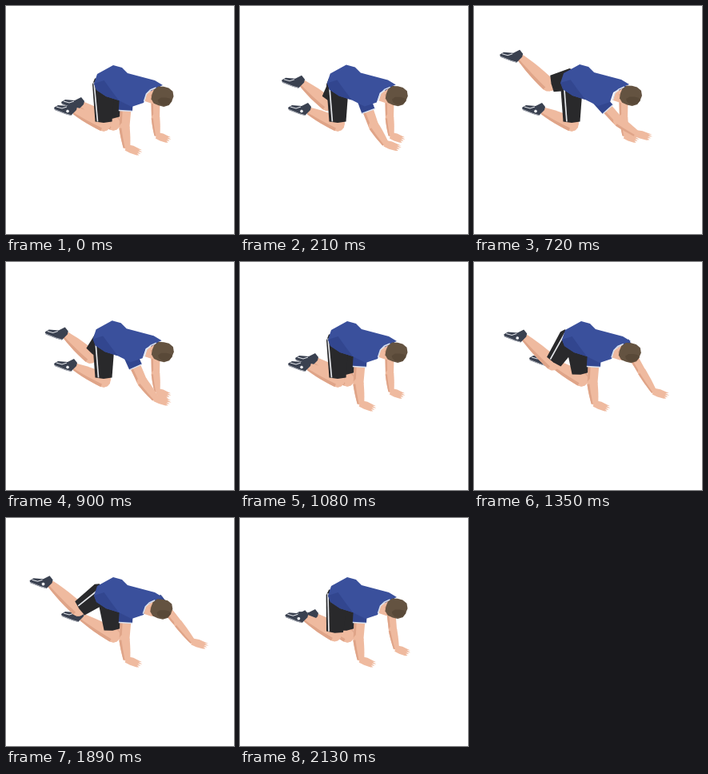
Recreate the animation shown at these times as an HTML page. Size 285 by 285 pixels, loop 2.16 s.

```html
<!DOCTYPE html>
<html lang="en">
<head>
<meta charset="utf-8">
<style>
  html, body { margin: 0; width: 100%; height: 100%; overflow: hidden; background: #fff; }
  svg { display: block; width: 100vw; height: 100vh; }
</style>
</head>
<body>
<svg id="stage" viewBox="0 0 285 285"></svg>
<script>
const HALF = 1080, PEAK = 570, STEP = 30;
const SKIN = '#efba9f', SHADE = '#dfa488', BLACK = '#29292b', BLUE = '#3a509c',
      DARK_BLUE = '#32468f', NAVY = '#3a4150', TRIM = '#dbe2ef', HAIR = '#645341';

// Joints from root to tip, at rest and raised; bow bends the path between, scaled per joint by share.
const limbs = {
  farLeg: { rest: [[128, 98], [134, 147], [95, 124]], raised: [[121, 90], [89, 88], [49, 50]],
            bow: [-9, -3], share: [0, 1, 0] },
  nearLeg: { rest: [[122, 98], [122, 148], [86, 131]], raised: [[117, 92], [72, 76], [38, 54]],
             bow: [0, 13], share: [0, 1, 0] },
  nearArm: { rest: [[150, 122], [148, 152], [151, 177], [170, 184]],
             raised: [[162, 122], [184, 140], [207, 151], [228, 156]],
             bow: [11, 5], share: [.3, .6, 1, 1] },
  farArm: { rest: [[187, 115], [187, 140], [189, 162], [206, 168]],
            raised: [[203, 105], [224, 113], [246, 126], [267, 132]],
            bow: [9, 17], share: [.2, .6, 1, 1] }
};
const torso = [[110, 97], [114, 85], [134, 74], [145, 77], [152, 84], [186, 93], [196, 99],
               [186, 103], [176, 109], [172, 121], [157, 126], [141, 118], [125, 113], [113, 105]];
const shoeShape = [[-26, -4], [-21, -7], [-9, -6], [-1, -10], [3, -5], [2, -1], [-5, 6], [-12, 4], [-25, -1]];

const svg = document.getElementById('stage');
const layers = {};
function paint(name, points, color, stroke = 0) {
  let el = layers[name];
  if (!el) {
    el = layers[name] = document.createElementNS('http://www.w3.org/2000/svg', 'path');
    el.setAttribute('fill', stroke ? 'none' : color);
    if (stroke) {
      el.setAttribute('stroke', color);
      el.setAttribute('stroke-width', stroke);
    }
    svg.append(el);
  }
  el.setAttribute('d', 'M' + points.map(p => p.map(v => v.toFixed(2))).join('L') + (stroke ? '' : 'Z'));
}

const mix = (a, b, u) => a.map((v, i) => v + (b[i] - v) * u);
const offset = (shape, [x, y]) => shape.map(p => [p[0] + x, p[1] + y]);
const range = (n, f) => Array.from({ length: n }, (_, i) => f(i));
const ring = (n, rx, ry, wobble = 0) => range(n, i => {
  const angle = i / n * 2 * Math.PI, r = 1 + wobble * Math.sin(i * 4.3);
  return [rx * r * Math.cos(angle), ry * r * Math.sin(angle)];
});

// Even rise, then a fall that starts gently.
function lift(t) {
  if (t < 0 || t > HALF) return 0;
  if (t < PEAK) return t / PEAK;
  const left = (HALF - t) / (HALF - PEAK);
  return (left + Math.sin(left * Math.PI / 2)) / 2;
}

const pose = ({ rest, raised, bow, share }, u) => rest.map((p, j) =>
  mix(p, raised[j], u).map((v, k) => v + bow[k] * share[j] * Math.sin(Math.PI * u)));

// Maps [fraction along the bone, pixels sideways] to the stage.
function along(a, b, shape) {
  const dx = b[0] - a[0], dy = b[1] - a[1], len = Math.hypot(dx, dy) || 1;
  return shape.map(([u, w]) => [a[0] + dx * u - dy / len * w, a[1] + dy * u + dx / len * w]);
}

// Tapered bone with a round start and a bulge along its length.
function bone(name, a, b, w0, w1, bulge, shadeSide) {
  const len = Math.hypot(b[0] - a[0], b[1] - a[1]) || 1;
  const width = u => w0 + (w1 - w0) * u + bulge * Math.sin(Math.PI * u);
  const edge = side => range(7, i => [i / 6, side * width(i / 6)]);
  const cap = range(5, i => {
    const angle = Math.PI * (i + 1) / 6;
    return [-w0 * Math.sin(angle) / len, -w0 * Math.cos(angle)];
  });
  paint(name, along(a, b, [...cap, ...edge(1), [1 + w1 / 2 / len, 0], ...edge(-1).reverse()]), SKIN);
  paint(name + 'Shade', along(a, b, [...edge(shadeSide), ...edge(shadeSide * .55).reverse()]), SHADE);
}

function leg(name, [hip, knee, ankle], hem) {
  bone(name + 'Thigh', knee, mix(knee, hip, .35), 8.5, 8, 0, 1);
  bone(name + 'Calf', knee, ankle, 8.8, 4.8, 1, -1);
  paint(name + 'Shorts', along(hip, knee, [[-.15, -11], [0, -14], [hem, -10.5],
    [hem + .03, 0], [hem, 10.5], [0, 14], [-.15, 11]]), BLACK);
  paint(name + 'Shoe', offset(shoeShape, ankle), NAVY);
  paint(name + 'Sole', offset([[-26, -2], [-12, 3.5], [-5, 5.5]], ankle), '#c9ccd4', .8);
  paint(name + 'Toe', offset([[-23, -5], [-16, -3], [-10, -5]], ankle), '#e3e5ea', 1.1);
}

function arm(name, [shoulder, elbow, wrist, tip], w, sleeve, hem) {
  bone(name + 'Upper', shoulder, elbow, w, w * .9, 0, 1);
  bone(name + 'Fore', elbow, wrist, w * .95, w * .62, .4, 1);
  const fingers = range(4, i => [[1 - .06 * Math.abs(i - 1), 2.4 * i - 3.6], [.72, 2.4 * i - 2.4]]).flat();
  paint(name + 'Hand', along(wrist, tip, [[-.05, -4], [.35, -5], ...fingers, [.3, 5], [-.05, 4]]), SKIN);
  paint(name + 'Sleeve', along(shoulder, elbow,
    [[-.6, -sleeve], [-.6, sleeve], [hem, sleeve], [hem, -sleeve]]), DARK_BLUE);
  paint(name + 'Hem', along(shoulder, elbow, [[hem, sleeve], [hem, -sleeve]]), TRIM, 1.4);
}

function draw(t) {
  const first = lift(t), second = lift(t - HALF);
  const lean = 1 - (1 - first) ** 2, reach = second ** 2;
  const near = pose(limbs.nearLeg, second);
  const body = offset(torso, [-2 * lean, -lean]);

  arm('farArm', pose(limbs.farArm, second), 5.6, 5.8, .4 * reach);
  leg('far', pose(limbs.farLeg, first), .84);
  leg('near', near, .93);
  const side = 1 - 1.3 * reach - .2 * lean;
  paint('stripe', along(near[0], near[1], [[-.05, 12 * side], [.93, 7.5 * side]]), '#e6e8ec', 1.7);
  paint('mark', offset(ring(10, 1.9, 1.9), [near[2][0] - 9, near[2][1] + .5]), '#f0f1f4');
  arm('nearArm', pose(limbs.nearArm, first), 7, 8.6, .3);

  paint('shirt', body, BLUE);
  paint('shirtSide', [body[0], mix(body[0], body[4], .3), mix(body[12], body[4], .25),
    body[11], body[12], body[13]], DARK_BLUE);

  const head = [195.5 + lean * .5 - reach * 3, 113 - lean + reach * 2];
  paint('neck', offset([[-20, -3], [-9, -10], [-3, 0], [-6, 9], [-13, 9], [-22, 6]], head), SKIN);
  paint('neckShade', offset([[-15, -2], [-8, -3], [-5, 8], [-12, 8]], head), SHADE);
  paint('collar', offset([[-8, -11], [-15, -8], [-20, -3], [-23, 6]], head), TRIM, 1.5);
  paint('hair', offset(ring(13, 14, 12.8, .05), head), HAIR);
  paint('hairShade', offset(ring(9, 9, 5, .08), [head[0] + 3, head[1] + 6]), '#594938');
}

function frame() {
  draw(Math.floor(performance.now() % (2 * HALF) / STEP) * STEP);
  requestAnimationFrame(frame);
}
frame();
</script>
</body>
</html>
```
